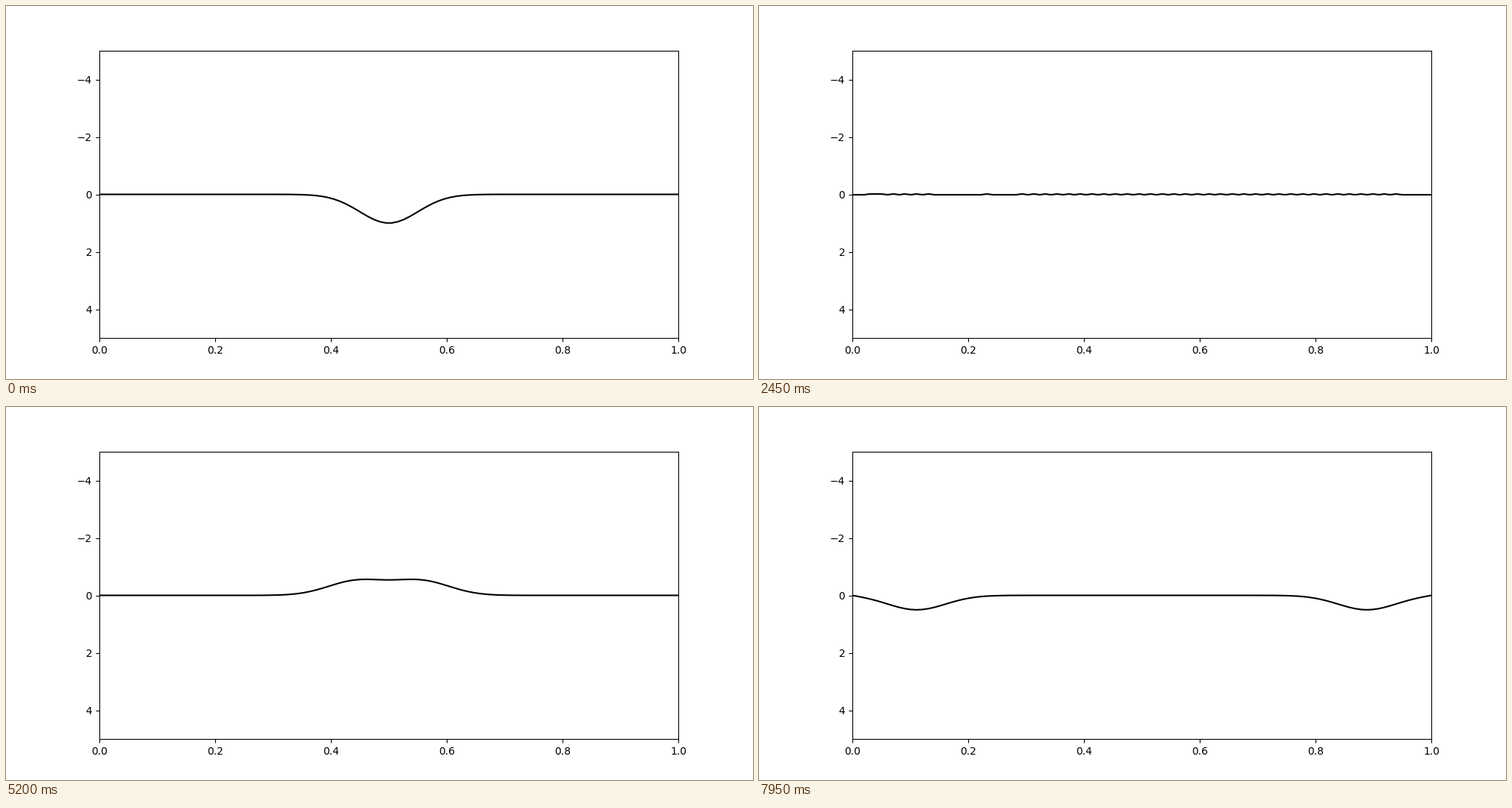
Animation of 1000 by 500 pixels, one loop 8 s. Source, as a matplotlib script:

```python
import numpy as np
import matplotlib.pyplot as plt
from matplotlib.animation import FuncAnimation

POINTS = 100
FRAMES = 160
INTERVAL = 50  # ms


def simulate(start, steps):
    """Leapfrog wave equation, one grid cell per step, ends held fixed."""
    states = [start]
    prev = start
    for _ in range(steps - 1):
        cur = states[-1]
        new = np.zeros_like(cur)
        new[1:-1] = cur[2:] + cur[:-2] - prev[1:-1]
        states.append(new)
        prev = cur
    return states


x = np.linspace(0, 1, POINTS)
pulse = np.exp(-0.5 * ((x - 0.5) / 0.05) ** 2)
pulse[[0, -1]] = 0
waves = simulate(pulse, FRAMES)

fig, ax = plt.subplots(figsize=(10, 5), dpi=100)
ax.set_xlim(0, 1)
ax.set_ylim(5, -5)
line, = ax.plot(x, waves[0], color="black", lw=1.5)


def update(i):
    line.set_ydata(waves[i])
    return line,


anim = FuncAnimation(fig, update, frames=FRAMES, interval=INTERVAL,
                     repeat=True, repeat_delay=0)
plt.show()
```
